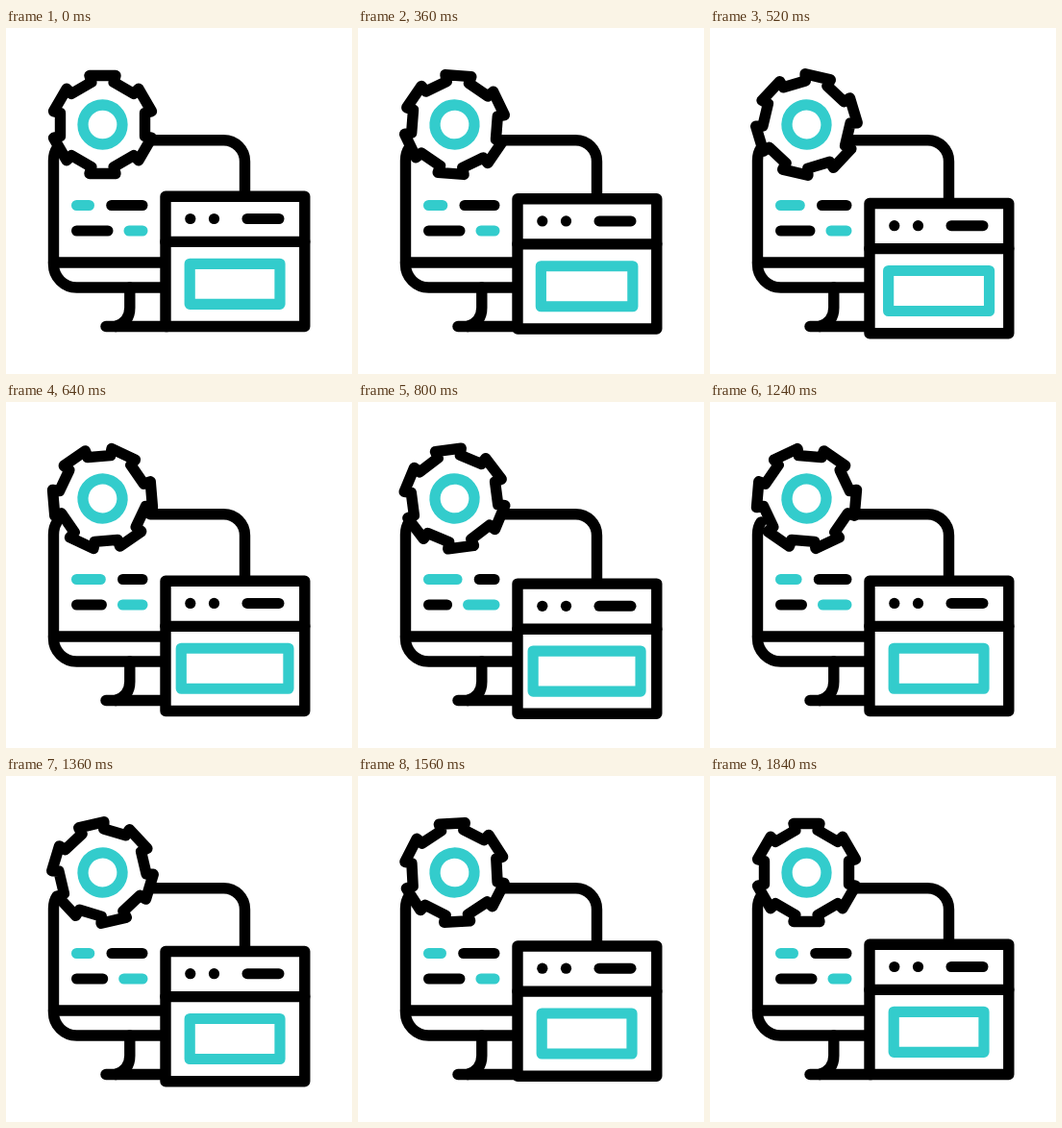
Write an HTML page with a canvas that moves like this. It is 360 px wide and 360 px high and loops after 2 s.

```html
<!DOCTYPE html>
<html lang="en">
<head>
<meta charset="utf-8">
<title>Computer, gear and window</title>
<style>
html, body { margin: 0; width: 100%; height: 100%; overflow: hidden; background: #fff; }
canvas { display: block; width: 360px; height: 360px; }
</style>
</head>
<body>
<canvas id="stage"></canvas>
<script>
const LOOP = 2000, STEP = 40, SIZE = 360;
const INK = '#000', TEAL = '#33cccc', LINE = 11.4;
const canvas = document.getElementById('stage');
const ctx = canvas.getContext('2d');
const scale = window.devicePixelRatio || 1;
canvas.width = canvas.height = Math.round(SIZE * scale);

// Symmetric cubic bezier (k, 0, 1 - k, 1), solved by bisection.
function ease(x, k) {
  if (x <= 0) return 0;
  if (x >= 1) return 1;
  let lo = 0, hi = 1;
  for (let i = 0; i < 24; i++) {
    const u = (lo + hi) / 2, v = 1 - u;
    const bx = 3 * k * u * v * v + 3 * (1 - k) * u * u * v + u * u * u;
    if (bx < x) lo = u; else hi = u;
  }
  return lo * lo * (3 - 2 * lo);
}

// 0 -> 1 -> 0, reaching 1 at the peak.
function pulse(t, start, peak, end, k = 1 / 3) {
  const p = t < peak ? (t - start) / (peak - start) : (end - t) / (end - peak);
  return ease(p, k);
}

function stroke(color = INK, width = LINE) {
  ctx.strokeStyle = color;
  ctx.lineWidth = width;
  ctx.stroke();
}

function line(x1, y1, x2, y2, color, width) {
  ctx.beginPath();
  ctx.moveTo(x1, y1);
  ctx.lineTo(x2, y2);
  stroke(color, width);
}

function dot(x, y, r) {
  ctx.beginPath();
  ctx.arc(x, y, r, 0, Math.PI * 2);
  ctx.fillStyle = INK;
  ctx.fill();
}

function monitor() {
  ctx.beginPath();
  ctx.moveTo(150, 116.7);
  ctx.lineTo(226, 116.7);
  ctx.arcTo(248.5, 116.7, 248.5, 140, 22);
  ctx.lineTo(248.5, 195);
  stroke();

  ctx.beginPath();
  ctx.moveTo(53, 125);
  ctx.quadraticCurveTo(49.5, 130, 49.5, 138);
  ctx.lineTo(49.5, 246);
  ctx.arcTo(49.5, 270, 74, 270, 24);
  ctx.lineTo(168, 270);
  stroke();
  line(49.5, 244, 168, 244);

  ctx.beginPath();
  ctx.moveTo(128.8, 270);
  ctx.lineTo(128.8, 291);
  ctx.quadraticCurveTo(128.8, 306, 114, 310.5);
  stroke();
  line(104, 310.5, 168, 310.5);
}

function codeLines(t) {
  const a = 17 * pulse(t, 260, 860, 1400);
  const b = 17.5 * pulse(t, 395, 985, 1575);
  line(73.5, 184.5, 86.5 + a, 184.5, TEAL, 11);
  line(109.7 + a, 184.5, 142, 184.5, INK, 11);
  line(73.5, 211, 106 - b, 211, INK, 11);
  line(128 - b, 211, 142, 211, TEAL, 11);
}

function gear(t) {
  const turn = Math.PI * ease((t - 100) / 1680, 0.635);
  const half = Math.PI * 14.8 / 180;
  ctx.save();
  ctx.translate(100.5, 100.5);
  ctx.rotate(turn);
  ctx.beginPath();
  for (let i = 0; i < 6; i++) {
    const mid = i * Math.PI / 3 - Math.PI / 2;
    for (const [r, side] of [[45.6, -1], [52.8, -1], [52.8, 1], [45.6, 1]]) {
      const a = mid + side * half;
      ctx.lineTo(r * Math.cos(a), r * Math.sin(a));
    }
  }
  ctx.closePath();
  ctx.fillStyle = '#fff';
  ctx.fill();
  stroke();
  ctx.beginPath();
  ctx.arc(0, 0, 20.5, 0, Math.PI * 2);
  stroke(TEAL, 11.3);
  ctx.restore();
}

function browser(t) {
  const drop = 14.4 * pulse(t, 100, 940, 1780, 0.5);
  const grow = 9.8 * pulse(t, 280, 720, 1200);
  ctx.save();
  ctx.translate(0, drop);
  ctx.beginPath();
  ctx.rect(166, 175.3, 144.8, 135.2);
  ctx.fillStyle = '#fff';
  ctx.fill();
  stroke();
  line(166, 222.4, 310.8, 222.4);
  dot(191.8, 198.5, 5.6);
  dot(216.5, 198.5, 5.6);
  line(251, 198.5, 284, 198.5, INK, 11);
  ctx.beginPath();
  ctx.rect(191.2 - grow, 245.3, 93.8 + 2 * grow, 42);
  stroke(TEAL, 11.2);
  ctx.restore();
}

function draw(now) {
  const t = Math.floor((now % LOOP) / STEP) * STEP;
  ctx.setTransform(scale, 0, 0, scale, 0, 0);
  ctx.fillStyle = '#fff';
  ctx.fillRect(0, 0, SIZE, SIZE);
  ctx.lineCap = ctx.lineJoin = 'round';
  monitor();
  codeLines(t);
  gear(t);
  browser(t);
}

const begin = performance.now();
function tick() {
  draw(performance.now() - begin);
  requestAnimationFrame(tick);
}
tick();
</script>
</body>
</html>
```
